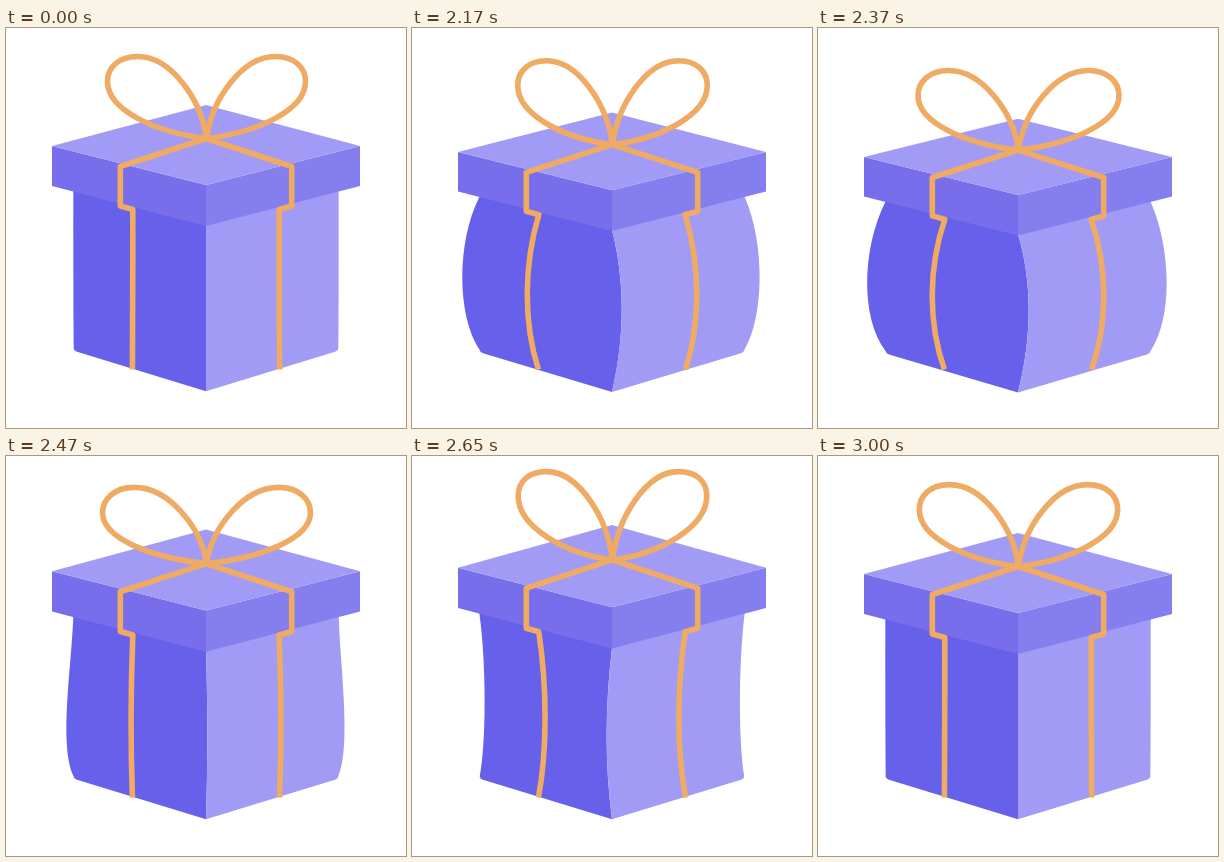
These frames come from a looping animation (400x400 px, 3020 ms). An HTML page:

```html
<!DOCTYPE html>
<html lang="en">
<head>
<meta charset="utf-8">
<title>Gift box</title>
<style>
  html, body { margin: 0; width: 100%; height: 100%; overflow: hidden; background: #fff; }
  svg { display: block; width: 100%; height: 100%; }
  .ribbon { fill: none; stroke: #efaa63; stroke-width: 5.6; stroke-linejoin: round; }
</style>
</head>
<body>
<svg viewBox="0 0 400 400">
  <path id="bodyLeft" fill="#6660ea"/>
  <path id="bodyRight" fill="#a29bf5"/>
  <path id="lidLeft" fill="#786eec"/>
  <path id="lidRight" fill="#857eee"/>
  <path id="lidTop" fill="#a29bf5"/>
  <path id="bandLeft" class="ribbon"/>
  <path id="bandRight" class="ribbon"/>
  <path id="bow" class="ribbon"/>
</svg>
<script>
const LOOP = 3020, START = 2020, STEP = 25, END = 38;

const smooth = u => (1 - Math.cos(Math.PI * u)) / 2;
const easeOut = u => 1 - (1 - u) ** 3;
const easeIn = u => u ** 3;

// Rest, squash, stretch, small rebound, rest
function swing(step, down, press, up, stretch, opening = smooth) {
  if (step <= -1 || step >= END) return 0;
  const stops = [[-1, 0], [down, press], [up, stretch], [up + 8.5, -0.17 * stretch], [END, 0]];
  const i = stops.findIndex(stop => step < stop[0]);
  const [from, a] = stops[i - 1], [to, b] = stops[i];
  const ease = i === 1 ? opening : smooth;
  return a + (b - a) * ease((step - from) / (to - from));
}

const lidDrop = step => swing(step, 13, 11.8, 21.5, -11);

const setPath = (id, d) => document.getElementById(id).setAttribute("d", d);

function draw(time) {
  const step = time < START ? -1 : Math.floor((time - START) / STEP);
  const drop = lidDrop(step);
  const upper = swing(step, 12, 26, 22, -11, easeOut);
  const lower = swing(step, 14, 26, 24, -7, easeOut);
  const bend = swing(step, 13, 17.5, 22.5, -11, easeOut);

  // The bow trails the lid: narrow and tall while it falls, wide and flat while it rises
  const sway = Math.tanh((drop - lidDrop(step - 2)) / 2);
  const bowW = 1 - 0.05 * sway;
  const bowH = 1 + 0.03 * sway + swing(step, 18, -0.04, 21, 0.1, easeIn);

  const back = 77 + 1.25 * drop, side = 118 + drop, front = 157 + 0.9 * drop;
  const sideLow = 158 + 0.95 * drop, frontLow = 198 + 0.85 * drop;
  const knot = 110.5 + 1.05 * drop;
  const sag = 0.4 + 0.25 * Math.max(drop, 0);
  const base = 363.3 + 0.1 * Math.max(drop, 0);

  const edge = 0.85 * bend;
  const bodyHalf = (dir, amount) => {
    const x = n => 200 + dir * n;
    return `M200 ${190 + drop}L${x(132.7)} ${160 + drop}V${163 + drop}` +
      `C${x(132.7 + upper * amount)} ${213 + drop / 2} ${x(132.7 + lower * amount)} 289 ${x(132.3)} ${320 + sag}` +
      `Q${x(132)} ${322.3 + sag} ${x(129)} ${323.3 + sag}L200 ${base}` +
      `C${200 + edge} 308 ${200 + edge} 253 200 ${frontLow - 1}Z`;
  };
  setPath("bodyLeft", bodyHalf(-1, 1));
  setPath("bodyRight", bodyHalf(1, 0.88));

  const lidHalf = x => `M${x} ${side}L200 ${front}V${frontLow}L${x} ${sideLow}Z`;
  setPath("lidLeft", lidHalf(46));
  setPath("lidRight", lidHalf(354));
  setPath("lidTop", `M46 ${side}L200 ${back}L354 ${side}L200 ${front}Z`);

  const band = dir => {
    const x = n => 200 + dir * n;
    const hem = 178 + 0.9 * drop;
    return `M200 ${knot}L${x(85.7)} ${138.5 + drop}V${hem}L${x(73.2)} ${hem + 3.5}` +
      `C${x(73.2 + bend)} ${235 + drop / 2} ${x(73.2 + bend)} 295 ${x(73.6)} 341.5`;
  };
  setPath("bandLeft", band(-1));
  setPath("bandRight", band(1));

  const droop = 30 * (1 - bowH);
  const loop = dir => {
    const p = (x, y) => `${200.5 + dir * x * bowW} ${knot - y * bowH} `;
    return "M" + p(0, 0) +
      "C" + p(5, 38) + p(35, 82) + p(69, 82) +
      "C" + p(88, 82) + p(99, 71 - droop) + p(99, 57 - droop) +
      "C" + p(99, 28 - droop) + p(50, 6) + p(0, 0);
  };
  setPath("bow", loop(-1) + loop(1));
}

function tick() {
  draw(performance.now() % LOOP);
  requestAnimationFrame(tick);
}
tick();
</script>
</body>
</html>
```
